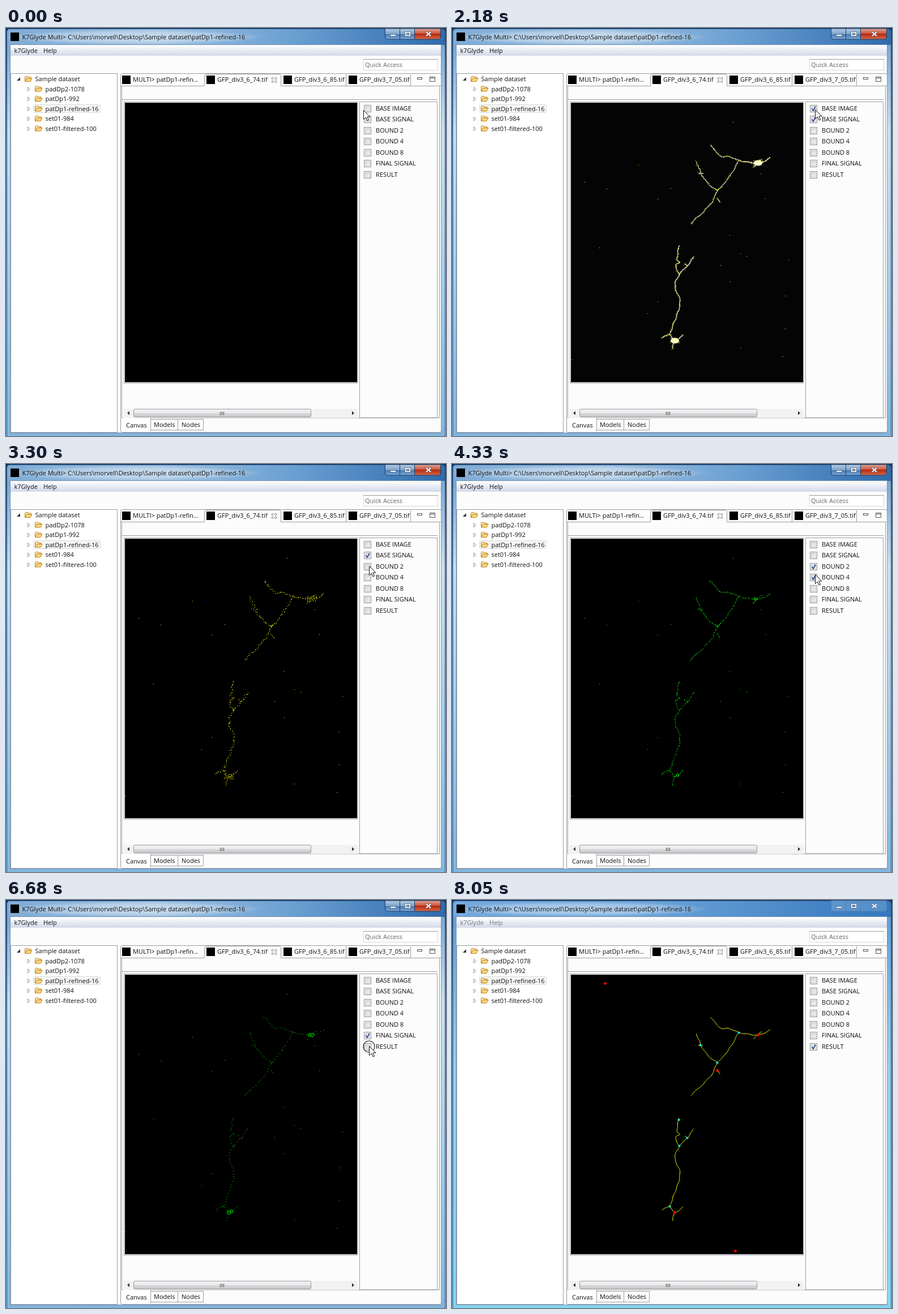
An HTML page with a canvas that plays this animation: 777 by 721 pixels, repeating every 8.1 s.

```html
<!DOCTYPE html>
<html lang="en">
<head>
<meta charset="utf-8">
<title>Layer viewer</title>
<style>
html, body { margin: 0; width: 100%; height: 100%; overflow: hidden; background: #1d4f86; }
svg { position: absolute; left: 0; top: 0; }
canvas { position: absolute; left: 210px; top: 132px; }
text { font: 11px "Open Sans", "Noto Sans", sans-serif; fill: #111; white-space: pre; }
.hint { fill: #666; }
.box { fill: #fff; stroke: #9a9ea6; }
.line { fill: none; stroke: #9a9ea6; }
.soft { fill: none; stroke: #d9dbe0; }
.idle .active, svg:not(.idle) .inactive { display: none; }
.idle .menu { fill: #777; }
</style>
</head>
<body>
<svg id="ui" width="777" height="721">
  <defs>
    <linearGradient id="desk" x2="0" y2="1">
      <stop stop-color="#0f335f"/><stop offset=".28" stop-color="#4f94cc"/><stop offset="1" stop-color="#8cc8ea"/>
    </linearGradient>
    <linearGradient id="bar">
      <stop stop-color="#7eabd6"/><stop offset=".35" stop-color="#9dc0e0"/>
      <stop offset=".65" stop-color="#6ba0d2"/><stop offset="1" stop-color="#2f6bad"/>
    </linearGradient>
    <linearGradient id="barIdle">
      <stop stop-color="#74a9dc"/><stop offset=".4" stop-color="#6fa6da"/><stop offset="1" stop-color="#3577bd"/>
    </linearGradient>
    <linearGradient id="side" x2="0" y2="1">
      <stop stop-color="#6a9dce"/><stop offset=".25" stop-color="#c6e0f3"/><stop offset="1" stop-color="#7fb5de"/>
    </linearGradient>
    <linearGradient id="sideIdle" x2="0" y2="1">
      <stop stop-color="#5e9ad4"/><stop offset=".4" stop-color="#93cdee"/><stop offset="1" stop-color="#82d6f2"/>
    </linearGradient>
    <linearGradient id="menuBg" x2="0" y2="1"><stop stop-color="#fff"/><stop offset="1" stop-color="#d3dbeb"/></linearGradient>
    <linearGradient id="red" x2="0" y2="1">
      <stop stop-color="#e0a493"/><stop offset=".45" stop-color="#cc5a42"/>
      <stop offset=".5" stop-color="#b52a10"/><stop offset="1" stop-color="#d4694c"/>
    </linearGradient>
    <linearGradient id="glass" x2="0" y2="1">
      <stop stop-color="#b4cbe4"/><stop offset=".5" stop-color="#7ea3cd"/>
      <stop offset=".55" stop-color="#4a7ab2"/><stop offset="1" stop-color="#78a8d8"/>
    </linearGradient>
    <linearGradient id="thumb" x2="0" y2="1">
      <stop stop-color="#f5f5f5"/><stop offset=".5" stop-color="#e8e8ea"/>
      <stop offset=".52" stop-color="#d6d7da"/><stop offset="1" stop-color="#c6c8cc"/>
    </linearGradient>
    <linearGradient id="tick" x2="1" y2="1"><stop stop-color="#d3d6da"/><stop offset="1" stop-color="#f8f8f9"/></linearGradient>
    <radialGradient id="glow">
      <stop stop-color="#fff" stop-opacity=".5"/><stop offset=".7" stop-color="#fff" stop-opacity=".3"/>
      <stop offset="1" stop-color="#fff" stop-opacity="0"/>
    </radialGradient>
    <g id="folder" stroke="#b9811f" stroke-linejoin="round">
      <path d="M1.5 10.5V2.5l1-1h4l1 1.5h4.5v2" fill="#fbe6a8"/>
      <path d="M1.5 10.5l3-5.5h9.500l-3 5.500z" fill="#fbd77d"/>
    </g>
  </defs>

  <rect width="777" height="721" fill="url(#desk)"/>
  <g stroke="#2f557f">
    <rect class="active" x="1.500" y="1.500" width="774" height="730" rx="6" fill="url(#side)"/>
    <rect class="inactive" x="1.500" y="1.500" width="774" height="730" rx="6" fill="url(#sideIdle)"/>
  </g>
  <path class="active" d="M2 30V7q0-5 5-5h763q5 0 5 5v23z" fill="url(#bar)"/>
  <path class="inactive" d="M2 30V7q0-5 5-5h763q5 0 5 5v23z" fill="url(#barIdle)"/>
  <ellipse cx="226" cy="16" rx="230" ry="13" fill="url(#glow)"/>
  <rect x="8" y="8" width="15" height="15"/>
  <text x="28.500" y="20" id="title"></text>

  <g class="active" stroke="#203d63">
    <path d="M669.500 1v15q0 4 4 4h48V1zM695.500 1v19" fill="url(#glass)"/>
    <path d="M721.500 1v19h41q5 0 5-4V1z" fill="url(#red)"/>
  </g>
  <path class="inactive" d="M669.500 1v15q0 4 4 4h90q4 0 4-4V1zM695.500 1v19M721.500 1v19" stroke="#4d7daf" fill="#8ebbe3" fill-opacity=".35"/>
  <g fill="#fff" stroke="#44546b" stroke-width=".7">
    <rect x="678.500" y="11.500" width="10" height="3"/>
    <path fill-rule="evenodd" d="M704.500 6.500h10v8h-10zm2.500 2.500v3h5v-3z"/>
    <path d="M740 6.500h3.500l2.500 2.500 2.500-2.500h3.500l-4 4 4 4h-3.500l-2.500-2.500-2.500 2.500h-3.500l4-4z"/>
  </g>

  <rect x="7.500" y="29.500" width="761" height="686" fill="#fcfcfc" stroke="#7695b3"/>
  <rect x="8" y="30" width="760" height="18" fill="url(#menuBg)"/>
  <path class="soft" d="M8 48.500h760"/>
  <text class="menu" x="14.500" y="44" id="menuName"></text><text class="menu" x="66" y="44">Help</text>
  <rect class="box" x="631.500" y="55.500" width="131" height="19" style="stroke:#d5d8dd"/>
  <path class="line" d="M631 55.500h132"/>
  <text class="hint" x="634" y="69">Quick Access</text>

  <rect class="box" x="8.500" y="80.500" width="188" height="634"/>
  <rect x="48.500" y="135.500" width="118" height="14" rx="2" fill="#f6f6f6" stroke="#d9d9d9"/>
  <path d="M25 87v6h-6z" fill="#333"/>
  <g id="tree"></g>

  <rect class="box" x="202.500" y="80.500" width="566" height="634" rx="3" style="fill:#fcfcfc"/>
  <path class="line" d="M202.500 102.500H350.500V84.500q0-3 3-3h129q3 0 3 3V102.500H768M600.500 82v20M714.500 82v20"/>
  <path d="M351 102.500h134" stroke="#fff"/>
  <g id="tabs"></g>
  <g fill="none" stroke="#555">
    <path d="M469.500 88l2-.5 2 2 2-2 2 .5v2l-2 2 2 2v2h-2l-2-2-2 2h-2v-2l2-2-2-2z" stroke-width=".8"/>
    <rect x="726.500" y="87.500" width="8" height="3"/>
    <path d="M748.500 86.500h9v8h-9zM748 88.500h10"/>
  </g>
  <path class="line" d="M204.500 102v587h561V102M205 126.500h557"/>
  <rect class="box" x="208.500" y="130.500" width="412" height="497"/>
  <rect class="box" x="624.500" y="130.500" width="137" height="558" style="fill:#fcfcfc"/>
  <rect x="207" y="673" width="414" height="16" fill="#f2f2f3"/>
  <rect x="225.500" y="673.500" width="313" height="14" rx="2" fill="url(#thumb)" stroke="#979797"/>
  <path d="M378.500 678v6M381.500 678v6M384.500 678v6" stroke="#444"/>
  <path d="M218 677v7l-4-3.500zM611 677v7l4-3.500z" fill="#333"/>
  <rect x="205" y="689" width="51" height="25" fill="#fff"/>
  <path class="line" d="M255.500 689v24M256 691.500h92M256 710.500h92.500V691M303.500 691v19"/>
  <text x="212" y="706">Canvas</text><text x="261" y="705">Models</text><text x="310" y="705">Nodes</text>

  <g id="options"></g>
  <circle id="ring" cy="1" r="10" fill="none" stroke="#222" stroke-width="1.200"/>
  <path id="cursor" d="M.5.5v16l4-3.500 2.500 6 2.500-1-2.500-6h5z" fill="#fff" stroke="#111"/>
</svg>
<canvas id="view" width="410" height="494"></canvas>

<script>
const $ = id => document.getElementById(id);
$("title").textContent = "K7Glyde Multi> C:\\Users\\morvell\\Desktop\\Sample dataset\\patDp1-refined-16";
$("menuName").textContent = "k7Glyde";

$("tree").innerHTML = ["Sample dataset", "padDp2-1078", "patDp1-992", "patDp1-refined-16", "set01-984", "set01-filtered-100"]
  .map((name, i) => {
    const x = i ? 50 : 32, y = 84 + i * 17.5;
    const arrow = i ? `<path d="M38.5 ${y + 3}v7l4-3.5z" fill="#fff" stroke="#999"/>` : "";
    return `${arrow}<use href="#folder" x="${x}" y="${y}"/><text x="${x + 19.5}" y="${y + 10}">${name}</text>`;
  }).join("");

$("tabs").innerHTML = [[205, "MULTI> patDp1-refin..."], [354, "GFP_div3_6_74.tif"], [490, "GFP_div3_6_85.tif"], [605, "GFP_div3_7_05.tif"]]
  .map(([x, name]) => `<rect x="${x}" y="84" width="15" height="15"/><text x="${x + 19}" y="95">${name}</text>`).join("");

const ROW = 19.45;
$("options").innerHTML = ["BASE IMAGE", "BASE SIGNAL", "BOUND 2", "BOUND 4", "BOUND 8", "FINAL SIGNAL", "RESULT"]
  .map((name, i) => {
    const y = Math.round(136 + i * ROW);
    return `<rect x="632.5" y="${y + .5}" width="12" height="12" fill="#fff" stroke="#8e8f8f"/>
      <rect x="634.5" y="${y + 2.5}" width="8" height="8" fill="url(#tick)" stroke="#c3c7cc"/>
      <path class="check" d="M635.5 ${y + 6.5}l2.5 3.5 4-7.5" fill="none" stroke="#3b4f93" stroke-width="1.9"/>
      <text x="653" y="${y + 9.5}">${name}</text>`;
  }).join("");
const checks = document.querySelectorAll(".check");

let seed = 7;
const rand = () => (seed = seed * 16807 % 2147483647) / 2147483647;
const spread = size => (rand() - .5) * size;
const points = s => s.split(" ").map(p => p.split(",").map(Number));

// Smooth, slightly wavy line through key points, about one sample per pixel
function curve(keys) {
  const k = points(keys), out = [];
  const spline = (a, b, c, d, u) =>
    b + u / 2 * (c - a + u * (2 * a - 5 * b + 4 * c - d + u * (3 * (b - c) + d - a)));
  for (let i = 0; i < k.length - 1; i++) {
    const p = k[i], q = k[i + 1], before = k[i - 1] || p, after = k[i + 2] || q;
    const n = Math.ceil(Math.hypot(q[0] - p[0], q[1] - p[1]));
    for (let j = 0; j <= n; j++) {
      const [x, y] = [0, 1].map(c => spline(before[c], p[c], q[c], after[c], j / n));
      out.push([x + .6 * Math.sin(y / 3), y + .6 * Math.sin(x / 3)]);
    }
  }
  return out;
}

const branches = [
  "456,206 473,225 490,227 506,234",
  "506,234 540,238 561,229",
  "506,234 486,267 468,287",
  "431,236 446,268 468,287",
  "468,287 455,312 421,345",
  "400,384 397,407 402,413 394,419 401,434",
  "426,404 415,420 401,434",
  "401,434 393,456 402,486 384,541",
  "370,548 384,541 392,552 408,542",
  "392,552 389,567",
  "532,245 546,232", "435,256 443,256", "468,301 472,307", "410,417 415,420"
].map(curve);
const somas = points("540,238 393,552");
const specks = Array.from({ length: 22 }, () => [210 + rand() * 410, 140 + rand() * 484]);

const every = (step, jitter) => branches.flatMap(b =>
  b.filter((_, i) => i % step === 0).map(([x, y]) => [x + spread(jitter), y + spread(jitter)]));
const grain = somas.flatMap(([x, y]) =>
  Array.from({ length: 45 }, () => [x + 2 * Math.round(spread(9)), y + 2 * Math.round(spread(5))]));
const signal = [...specks, ...every(2, 3), ...grain];
const fine = [...specks, ...every(3, 1.5)];
const sparse = [...specks, ...every(5, 1.2)];

const g = $("view").getContext("2d");
g.translate(-210, -132);

function stroke(line, color, width) {
  g.strokeStyle = color;
  g.lineWidth = width;
  g.beginPath();
  line.forEach(([x, y]) => g.lineTo(x + .5, y + .5));
  g.stroke();
}
function dots(list, color) {
  g.fillStyle = color;
  for (const [x, y] of list) g.fillRect(Math.round(x), Math.round(y), 1, 1);
}
function blob([x, y], rx, ry, color) {
  g.fillStyle = color;
  g.beginPath();
  g.ellipse(x + .5, y + .5, rx, ry, 0, 0, 7);
  g.fill();
}
function circles(shift, r) {
  somas.forEach(([x, y], i) => {
    g.strokeStyle = "#0f0";
    g.lineWidth = 1;
    g.beginPath();
    g.arc(x + .5 + (i ? shift : -shift), y + .5 - i * shift / 2, r, 0, 7);
    g.stroke();
  });
}
function bound(list, small, big) {
  dots(list, "#0f0");
  if (small) circles(5, 2.3);
  if (big) circles(0, 3.2);
}
function baseImage() {
  g.fillStyle = "#040404";
  g.fillRect(210, 132, 410, 494);
  dots(specks, "#444");
  branches.forEach((b, i) => stroke(b, i === 1 ? "#eee" : "#aaa", i < 5 ? 1.4 : 1.8));
  somas.forEach(s => blob(s, 7.500, 5, "#fff"));
}
function result() {
  branches.forEach(b => stroke(b, "#ff0", 1));
  points("506,234 438,256 468,287 400,388 415,420 401,434 384,541").forEach(p => blob(p, 2, 2, "#0ff"));
  [...somas, ...points("270,147 468,301 500,620")].forEach(p => blob(p, 2.4, 2.4, "#f00"));
}
const layers = [
  baseImage,
  () => dots(signal, "#ff0"),
  () => bound(fine),
  () => bound(sparse, true),
  () => bound(sparse, false, true),
  () => bound(sparse, true, true),
  result
];

// Each click shows a ring, then toggles its option: time, option
const LOOP = 8100, PRESS = 140, CLOSE = 8050;
const clicks = points("500,0 1610,1 2460,0 3310,2 3750,1 4175,3 4460,2 5020,4 5430,3 5705,5 5980,4 6680,6 7105,5");
const stops = [
  { t: -PRESS, x: 631, y: 145 },
  ...clicks.map(([t, i]) => ({ t, x: 641, y: 141.5 + i * ROW })),
  { t: CLOSE, x: 720, y: 730 }
];

// The pointer rests during a press, then eases to the next stop
function pointer(t) {
  const i = Math.max(1, stops.findIndex(s => s.t > t)), a = stops[i - 1], b = stops[i];
  const leave = a.t + PRESS, arrive = b.t - PRESS / 2;
  const u = Math.min(1, Math.max(0, (t - leave) / (arrive - leave))), e = u * u * (3 - 2 * u);
  return [Math.round(a.x + (b.x - a.x) * e), Math.round(a.y + (b.y - a.y) * e)];
}

function draw(t) {
  const idle = t >= CLOSE;
  const step = Math.min(CLOSE - 1, Math.round(t / PRESS) * PRESS);
  const place = `translate(${pointer(step).join(" ")})`;
  const pressed = clicks.some(([at]) => t >= at && t < at + PRESS);
  $("ui").classList.toggle("idle", idle);
  $("cursor").setAttribute("transform", place);
  $("cursor").style.display = idle ? "none" : "";
  $("ring").setAttribute("transform", place);
  $("ring").style.display = pressed ? "" : "none";

  g.fillStyle = "#000";
  g.fillRect(210, 132, 410, 494);
  layers.forEach((paint, i) => {
    const on = clicks.filter(([at, option]) => option === i && t >= at + PRESS).length % 2;
    checks[i].style.display = on ? "" : "none";
    if (on) paint();
  });
}
function tick() {
  draw(performance.now() % LOOP);
  requestAnimationFrame(tick);
}
tick();
</script>
</body>
</html>
```
